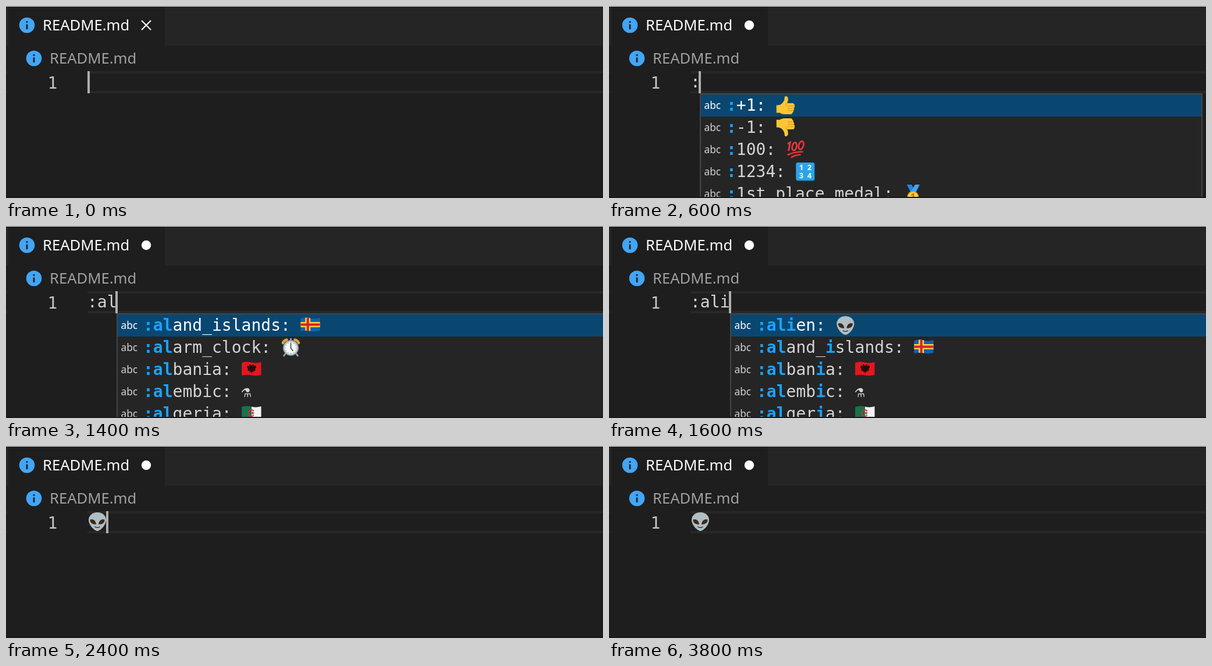
An HTML page with a canvas that plays this animation: 1026 by 330 pixels, repeating every 4000 ms.

```html
<!DOCTYPE html>
<html lang="en">
<head>
<meta charset="utf-8">
<title>Emoji completion</title>
<style>
html, body { margin: 0; width: 100%; height: 100%; overflow: hidden; background: #1e1e1e; }
canvas { display: block; }
</style>
</head>
<body>
<canvas id="stage" width="1026" height="330"></canvas>
<script>
const ctx = document.getElementById('stage').getContext('2d');
const LOOP = 4000, ROW = 38, CHAR = 28 * 0.602;
const MONO = '"DejaVu Sans Mono", monospace';
const SANS = '"Noto Sans", sans-serif';

function rect(x, y, w, h, color) {
  ctx.fillStyle = color;
  ctx.fillRect(x, y, w, h);
}
function text(s, x, y, font, color, align = 'left') {
  ctx.font = font;
  ctx.fillStyle = color;
  ctx.textAlign = align;
  ctx.fillText(s, x, y);
}
function fill(d, color) {
  ctx.fillStyle = color;
  ctx.fill(new Path2D(d));
}
function line(d, color, width) {
  ctx.strokeStyle = color;
  ctx.lineWidth = width;
  ctx.stroke(new Path2D(d));
}
function disc(x, y, r, color) {
  ctx.fillStyle = color;
  ctx.beginPath();
  ctx.arc(x, y, r, 0, Math.PI * 2);
  ctx.fill();
}
function ring(x, y, rx, ry, tilt, color, width) {
  ctx.strokeStyle = color;
  ctx.lineWidth = width;
  ctx.beginPath();
  ctx.ellipse(x, y, rx, ry, tilt, 0, Math.PI * 2);
  ctx.stroke();
}

// Emoji are drawn in a 32 by 32 box.
function tile(color, shade) {
  ctx.fillStyle = shade;
  ctx.beginPath();
  ctx.roundRect(0, 0, 32, 31.5, 3);
  ctx.fill();
  ctx.fillStyle = color;
  ctx.beginPath();
  ctx.roundRect(0, 0, 31, 30, 3);
  ctx.fill();
}
const redTile = () => tile('#e8393c', '#c62828');
const blueTile = () => tile('#2ea3ea', '#1b87cc');
function label(s, x, y, size) {
  text(s, x, y, `bold ${size}px ${SANS}`, '#fff', 'center');
}
function quad(chars) {
  blueTile();
  [...chars].forEach((c, i) => label(c, 9 + 14 * (i % 2), 13 + 14 * (i >> 1), 13));
}
function flag(paint) {
  ctx.clip(new Path2D('M-1 4Q8 1.5 16 3.5T32.5 3V25Q24 27 16 25.5T-1 26Z'));
  paint();
}

const emoji = {
  thumb() {
    fill('M0 15.5Q6 16 9 13C12 10 14 7 14 2C14-1 19.5-1 20 4C20.3 7 19.5 9 18.5 12L28 12Q31.5 13 31 16Q32 19 30 20Q31 23 29 24.5Q30 27 27.5 28Q27.5 31 24 31L14 31Q8 30.5 6 28.5L0 28.5Z', '#fcc633');
    line('M18 16.5Q24 17.5 30 16.5M19 20.7Q24 21.5 29.5 20.5M19 24.7Q24 25.5 28.5 24.6M18.5 12Q16 13 15.5 16', '#e39a1b', 1.2);
  },
  thumbDown() {
    ctx.translate(0, 31);
    ctx.scale(1, -1);
    emoji.thumb();
  },
  hundred() {
    const red = '#e8353a';
    line('M2.5 6L6.5 3.5L4 18', red, 3);
    ring(14, 10.5, 3.7, 7, 0.25, red, 2.8);
    ring(25.5, 8.5, 4, 7.2, 0.3, red, 2.8);
    line('M2 25Q14 19.5 29 19.5M8 29.5Q15 25 25 24.5', red, 2.5);
  },
  digits: () => quad('1234'),
  medal() {
    fill('M5 0H13L20 12L13 16Z', '#1e88e5');
    fill('M19 0H27L19 16L12 12Z', '#42a5f5');
    disc(15.5, 21, 10, '#e8a317');
    disc(15.5, 21, 8, '#fcd23c');
    text('1', 15.5, 27, `bold 16px ${SANS}`, '#b8740e', 'center');
  },
  a() {
    redTile();
    label('A', 16, 25, 28);
  },
  ab() {
    redTile();
    label('AB', 15.7, 21.5, 18);
  },
  abacus() {
    const beads = ['#e53935', '#e53935', '#43a047', '#43a047', '#1e88e5'];
    rect(3, 3, 24, 26, '#42341f');
    beads.forEach((color, i) => {
      const y = 3.5 + i * 5;
      rect(3, y + 1.5, 24, 1, '#b0a080');
      for (let n = 0; n < 6; n++) rect(3.5 + n * 3 + (n > 3 - i % 2 ? 5 : 0), y, 2.7, 4, color);
    });
    rect(1, 0, 2.5, 31, '#eeb52e');
    rect(26.5, 0, 2.5, 31, '#eeb52e');
    rect(1, 1, 28, 2.2, '#d99b22');
    rect(1, 28, 28, 2.2, '#d99b22');
  },
  abc() {
    blueTile();
    label('abc', 15.7, 19.5, 14);
  },
  abcd: () => quad('abcd'),
  aland: () => flag(() => {
    rect(-1, 0, 34, 30, '#0f62b5');
    rect(7, 0, 9, 30, '#ffd23f');
    rect(-1, 10, 34, 9, '#ffd23f');
    rect(9.5, 0, 4, 30, '#d8202f');
    rect(-1, 12.5, 34, 4, '#d8202f');
  }),
  clock() {
    line('M7 26L3.5 31M25 26L28.5 31', '#8d9da6', 3);
    ctx.lineCap = 'round';
    line('M2.5 8Q4 3.5 9 2.5M23 2.5Q28 3.5 29.5 8', '#d8a640', 4.5);
    ctx.lineCap = 'butt';
    line('M16 0V5', '#90a4ae', 3);
    disc(16, 16.5, 13.5, '#82939c');
    disc(16, 16.5, 12.5, '#b5c4cb');
    disc(16, 16.5, 10.3, '#f7f8f8');
    line('M16 8V17L20 22', '#37474f', 1.6);
    for (let i = 0; i < 12; i++) {
      const t = i * Math.PI / 6;
      disc(16 + 9 * Math.cos(t), 16.5 + 9 * Math.sin(t), 0.6, '#607d8b');
    }
  },
  albania: () => flag(() => {
    rect(-1, 0, 34, 30, '#e3171e');
    fill('M16 9L13 6.5L11.5 8.5L14 10.5L9 8.5L8 12L10 15L9 18L13 17.5L12 20L15 19.5L16 23L17 19.5L20 20L19 17.5L23 18L22 15L24 12L23 8.5L18 10.5L20.5 8.5L19 6.5Z', '#2b090b');
  }),
  algeria: () => flag(() => {
    rect(-1, 0, 17, 30, '#17734a');
    rect(16, 0, 17, 30, '#f3f3f3');
    ctx.strokeStyle = '#d62839';
    ctx.lineWidth = 2;
    ctx.beginPath();
    ctx.arc(15.5, 14.5, 5.5, 0.7, 5.6);
    ctx.stroke();
    fill('M14 14.5L17 13.5L18 11L19 13.5L21 14.5L19 15.5L18 18L17 15.5Z', '#d62839');
  }),
  alien() {
    fill('M16 0C25 0 31 6 31 13C31 22 21 32 16 32C11 32 1 22 1 13C1 6 7 0 16 0Z', '#b0bec5');
    fill('M3.5 12.5C8 10.5 13.5 14 14 20.5C8 21.5 3 18 3.5 12.5ZM28.5 12.5C24 10.5 18.5 14 18 20.5C24 21.5 29 18 28.5 12.5Z', '#3f2b18');
    line('M11.5 24.5Q16 28 20.5 24.5', '#3f2b18', 1.4);
  }
};
function drawEmoji(name, x, y) {
  ctx.save();
  ctx.translate(x, y);
  emoji[name]();
  ctx.restore();
}

const steps = [
  { at: 0, typed: '', cursor: 140 },
  { at: 400, typed: ':', cursor: 154 },
  { at: 600, typed: ':', cursor: 154, left: 156, rows: [
    ['+1', 'thumb'], ['-1', 'thumbDown'], ['100', 'hundred'], ['1234', 'digits'], ['1st_place_medal', 'medal']] },
  { at: 1000, typed: ':a', cursor: 172, left: 174, rows: [
    ['a', 'a'], ['ab', 'ab'], ['abacus', 'abacus'], ['abc', 'abc'], ['abcd', 'abcd']] },
  { at: 1400, typed: ':al', cursor: 188, left: 190, rows: [
    ['aland_islands', 'aland'], ['alarm_clock', 'clock'], ['albania', 'albania'], ['alembic', '⚗'], ['algeria', 'algeria']] },
  { at: 1600, typed: ':ali', cursor: 206, left: 208, rows: [
    ['alien', 'alien'], ['aland_islands', 'aland'], ['albania', 'albania'], ['alembic', '⚗'], ['algeria', 'algeria']] },
  { at: 2400, typed: '', cursor: 172, done: true }
];
const blinkOff = [[900, 1000], [2000, 2400], [2900, 3400], [3800, 4000]];

function infoIcon(x, y) {
  disc(x, y, 13.3, '#42a5f5');
  rect(x - 1.4, y - 7, 2.8, 2.8, '#1e1e1e');
  rect(x - 1.4, y - 1.5, 2.8, 8.5, '#1e1e1e');
}

function drawFrame(dirty) {
  rect(0, 0, 1026, 330, '#1e1e1e');
  rect(0, 0, 1026, 68, '#252526');
  rect(4, 0, 269, 68, '#1e1e1e');
  rect(0, 0, 1026, 1, '#dcdcdc');
  infoIcon(36, 33);
  text('README.md', 63, 42, `25.6px ${SANS}`, '#fff');
  if (dirty) disc(241, 33, 8.2, '#fff');
  else line('M233 25L249 41M249 25L233 41', '#fff', 2.2);
  infoIcon(48, 90);
  text('README.md', 75, 99, `25.6px ${SANS}`, '#a0a0a0');
  for (const y of [112, 146]) {
    rect(0, y, 2, 4, '#282828');
    rect(140, y, 886, 4, '#282828');
  }
  text('1', 71.5, 142, `28px ${MONO}`, '#c6c6c6');
}

// Colours the typed letters wherever they occur in order.
function drawLabel(s, typed, x, y, color) {
  let hit = 0;
  [...s].forEach((c, i) => {
    const match = c === typed[hit];
    if (match) hit++;
    text(c, x + i * CHAR, y, `${match ? 'bold ' : ''}28px ${MONO}`, match ? '#18a3ff' : color);
  });
}

function drawList({ left, rows, typed }, barAlpha) {
  rect(left, 150, 864, 190, '#454545');
  rect(left + 2, 152, 860, 190, '#252526');
  rect(left + 2, 152, 860, ROW, '#094771');
  rows.forEach(([name, icon], i) => {
    const top = 152 + i * ROW, x = left + 46, s = `:${name}:`;
    const color = i ? '#d4d4d4' : '#fff';
    text('abc', left + 7.5, top + 25, `17.3px ${SANS}`, color);
    drawLabel(s, typed, x, top + 28, color);
    const end = x + (s.length + 1) * CHAR;
    if (emoji[icon]) drawEmoji(icon, end + 1.5, top + 3);
    else text(icon, end, top + 28, `28px ${MONO}`, color);
  });
  rect(left + 842, 152, 20, 40, `rgba(121,121,121,${0.4 * barAlpha})`);
}

function draw(t) {
  const step = steps.filter(s => s.at <= t).pop();
  drawFrame(t >= 400);
  text(step.typed, 140, 140, `28px ${MONO}`, '#d4d4d4');
  if (step.done) drawEmoji('alien', 141, 114);
  if (!blinkOff.some(([from, to]) => t >= from && t < to)) rect(step.cursor, 112, 4, 38, '#aeafad');
  if (step.rows) drawList(step, t < 700 ? 0 : t < 800 ? 0.5 : 1);
  rect(0, 328, 1026, 2, '#191919');
}

const start = performance.now();
function tick() {
  draw((performance.now() - start) % LOOP);
  requestAnimationFrame(tick);
}
tick();
</script>
</body>
</html>
```
